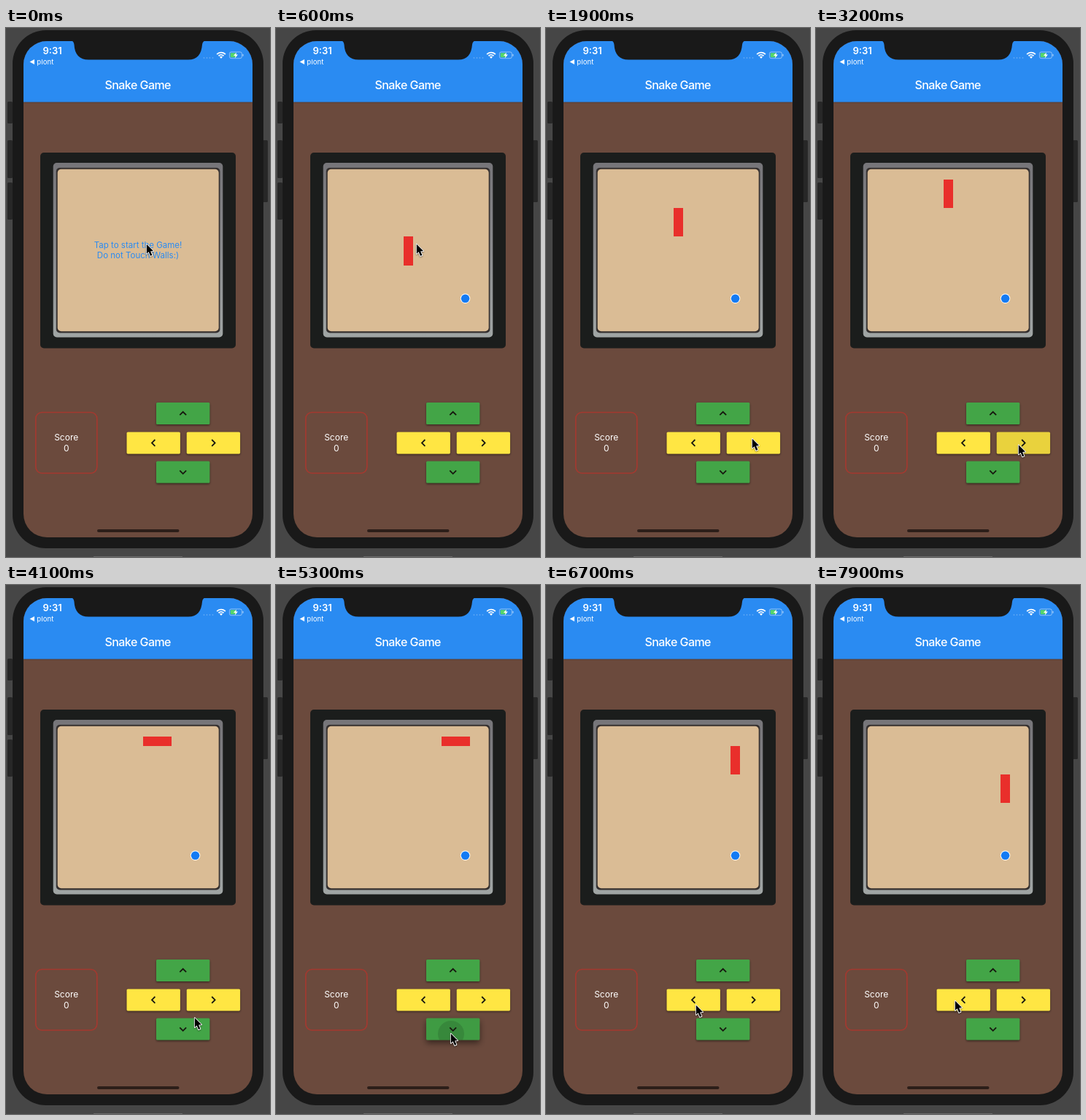
An HTML page with a canvas that plays this animation: 362x726 px, repeating every 8 s.

```html
<!DOCTYPE html>
<html lang="en">
<head>
<meta charset="utf-8">
<title>Snake Game</title>
<style>
html, body { margin: 0; width: 100%; height: 100%; overflow: hidden; background: #464646; }
canvas { display: block; width: 362px; height: 726px; }
</style>
</head>
<body>
<canvas id="stage"></canvas>
<script>
const W = 362, H = 726, LOOP = 8000, TICK = 400;
const START = 600, FIRST_TICK = 900;
const CELL = 13.06, BOARD_X = 70.2, BOARD_Y = 195;
const BLUE = '#2a8bf2', GREEN = '#43a547', YELLOW = '#ffe643', BROWN = '#6b4a3d', BEZEL = '#191919';
const FONT = 'Inter, Roboto, sans-serif';

const canvas = document.getElementById('stage');
const ctx = canvas.getContext('2d');
const dpr = window.devicePixelRatio || 1;
canvas.width = W * dpr;
canvas.height = H * dpr;

const buttons = {
  up: { x: 206, y: 514, color: GREEN, angle: 0 },
  left: { x: 165.5, y: 554.4, color: YELLOW, angle: -Math.PI / 2 },
  right: { x: 247.7, y: 554.4, color: YELLOW, angle: Math.PI / 2 },
  down: { x: 206, y: 594.6, color: GREEN, angle: Math.PI }
};
const BTN_W = 73.4, BTN_H = 30;

const presses = [
  { name: 'right', at: 2900, x: 278, y: 571 },
  { name: 'down', at: 5200, x: 240, y: 616 }
];

// Pointer stops: time, x, y
const stops = [
  [600, 192, 296], [1600, 283, 560], [1900, 282, 563], [2800, 277, 571.5],
  [3400, 277, 571.5], [4800, 239, 615], [5500, 239, 615],
  [6400, 206, 576], [6700, 205, 576], [7900, 190, 570]
];

function roundRect(x, y, w, h, r, fill) {
  ctx.beginPath();
  ctx.roundRect(x, y, w, h, r);
  if (fill) {
    ctx.fillStyle = fill;
    ctx.fill();
  }
}

function rect(x, y, w, h, fill) {
  ctx.fillStyle = fill;
  ctx.fillRect(x, y, w, h);
}

function circle(x, y, r, fill) {
  ctx.beginPath();
  ctx.arc(x, y, r, 0, Math.PI * 2);
  ctx.fillStyle = fill;
  ctx.fill();
}

function poly(points, fill) {
  ctx.beginPath();
  points.forEach(([x, y]) => ctx.lineTo(x, y));
  ctx.closePath();
  ctx.fillStyle = fill;
  ctx.fill();
}

function text(str, x, y, size, color, { weight = 400, align = 'center', spacing = 0 } = {}) {
  ctx.font = `${weight} ${size}px ${FONT}`;
  ctx.letterSpacing = spacing + 'px';
  ctx.textAlign = align;
  ctx.fillStyle = color;
  ctx.fillText(str, x, y);
}

function shadow(color, blur, dy) {
  ctx.shadowColor = color;
  ctx.shadowBlur = blur * dpr;
  ctx.shadowOffsetY = dy * dpr;
}

function gradient(y0, y1, ...colors) {
  const g = ctx.createLinearGradient(0, y0, 0, y1);
  colors.forEach((c, i) => g.addColorStop(i / (colors.length - 1), c));
  return g;
}

function drawPhone() {
  rect(0, 0, W, H, '#464646');
  for (const [x, y, h] of [[2, 101, 30], [2, 154, 52], [2, 212, 51], [352, 154, 85]]) {
    roundRect(x, y, 7, h, 1.5, '#272727');
  }
  roundRect(9, 3, 344, 711, 46, BEZEL);
  rect(120, 725, 122, 1, '#6a6a6a');

  ctx.save();
  roundRect(24, 18, 314, 681, 32);
  ctx.clip();
  rect(24, 18, 314, 681, BROWN);
  ctx.save();
  shadow('rgba(0,0,0,.3)', 2, 0.6);
  rect(24, 18, 314, 83.6, BLUE);
  ctx.restore();
  ctx.restore();

  ctx.beginPath();
  ctx.moveTo(89, 17);
  ctx.quadraticCurveTo(93, 18, 93.5, 23);
  ctx.bezierCurveTo(94, 36, 101, 43.5, 113, 43.5);
  ctx.lineTo(250, 43.5);
  ctx.bezierCurveTo(262, 43.5, 268, 36, 269, 23);
  ctx.quadraticCurveTo(269.5, 18, 274, 17);
  ctx.closePath();
  ctx.fillStyle = BEZEL;
  ctx.fill();
  roundRect(125, 688, 112.5, 4, 2, '#2c1e19');
}

function drawStatus() {
  text('9:31', 50.5, 35.5, 13, '#fff', { weight: 600, align: 'left' });
  poly([[32.5, 46.5], [39, 43], [39, 50]], '#fff');
  text('plont', 42.3, 50, 9.6, '#fff', { align: 'left', spacing: 0.1 });
  text('Snake Game', 180.7, 84, 16, '#fff', { weight: 500, spacing: -0.55 });
  for (let i = 0; i < 4; i++) circle(271.5 + i * 4, 41, 0.9, 'rgba(255,255,255,.25)');

  ctx.strokeStyle = '#fff';
  ctx.lineWidth = 1.8;
  for (const r of [4.8, 8]) {
    ctx.beginPath();
    ctx.arc(295, 41.6, r, -Math.PI * 0.76, -Math.PI * 0.24);
    ctx.stroke();
  }
  poly([[295, 42], [292.9, 39.6], [295, 38.7], [297.1, 39.6]], '#fff');

  ctx.lineWidth = 0.8;
  ctx.strokeStyle = 'rgba(255,255,255,.55)';
  roundRect(306.4, 32.9, 17, 8.8, 2.4);
  ctx.stroke();
  roundRect(324.3, 35.8, 1.3, 3, 0.6, 'rgba(255,255,255,.55)');
  roundRect(307.8, 34.3, 8, 6, 1.2, '#54d66a');
  poly([[316, 33.4], [312, 38], [314.7, 38], [313.8, 41.4], [318, 36.6], [315.3, 36.6]], '#fff');
}

function drawBoard() {
  roundRect(47, 171, 268, 268.5, 5, '#1b1d1c');
  roundRect(64.7, 185, 232.6, 239.5, 5, gradient(185, 424, '#767579', '#8a8b8e', '#a0a5a4'));
  roundRect(68.8, 191.8, 224.6, 226.6, 5, '#35302f');
  roundRect(70.7, 193.8, 221, 222.4, 5, '#dabc95');
}

// Head cell after n moves: up 6, right 6, then down.
function cellAt(n) {
  const right = Math.max(0, Math.min(n - 6, 6));
  const down = Math.max(0, n - 12);
  return [8 + right, 7 - Math.min(n, 6) + down];
}

// Cells snap to whole pixels so that neighbours meet without a seam.
function drawCell([c, r]) {
  const x = Math.round(BOARD_X + c * CELL), y = Math.round(BOARD_Y + r * CELL);
  const right = Math.round(BOARD_X + (c + 1) * CELL), bottom = Math.round(BOARD_Y + (r + 1) * CELL);
  rect(x, y, right - x, bottom - y, '#e92f2b');
}

function drawGame(t) {
  if (t < START) {
    text('Tap to start the Game!', 181, 302, 11.5, BLUE);
    text('Do not Touch Walls:)', 181, 316.3, 11.5, BLUE);
    return;
  }
  const moves = Math.max(0, Math.floor((t - FIRST_TICK) / TICK) + 1);
  [0, 1, 2].forEach(i => drawCell(cellAt(moves - i)));
  const fx = BOARD_X + 14.5 * CELL, fy = BOARD_Y + 13.5 * CELL;
  circle(fx, fy, 6.7, '#fff');
  circle(fx, fy, 5.8, '#147af3');
}

function drawScore() {
  roundRect(40.8, 527.5, 84, 83.5, 8.5);
  ctx.strokeStyle = '#a5382f';
  ctx.lineWidth = 1.6;
  ctx.stroke();
  text('Score', 82.7, 566, 12, '#fff');
  text('0', 82.7, 580.6, 12, '#fff');
}

function drawRipple(b, press, age) {
  const fade = Math.max(0, Math.min(1, (400 - age) / 200));
  ctx.save();
  roundRect(b.x, b.y, BTN_W, BTN_H, 1.6);
  ctx.clip();
  rect(b.x, b.y, BTN_W, BTN_H, `rgba(0,0,0,${0.06 * fade})`);
  circle(press.x, press.y, 4 + age * 0.14, `rgba(0,0,0,${0.12 * fade})`);
  ctx.restore();
}

function drawButton(name, t) {
  const b = buttons[name];
  const press = presses.find(p => p.name === name && t >= p.at && t < p.at + 400);
  const age = press ? t - press.at : 0;
  const raised = press && age > 0 && age < 300;

  ctx.save();
  shadow('rgba(0,0,0,.5)', raised ? 8 : 3, raised ? 4 : 1.3);
  roundRect(b.x, b.y, BTN_W, BTN_H, 1.6, b.color);
  ctx.restore();
  if (press) drawRipple(b, press, age);

  ctx.save();
  ctx.translate(b.x + BTN_W / 2, b.y + BTN_H / 2);
  ctx.rotate(b.angle);
  ctx.beginPath();
  ctx.moveTo(-4.4, 2.2);
  ctx.lineTo(0, -2.2);
  ctx.lineTo(4.4, 2.2);
  ctx.strokeStyle = '#17170f';
  ctx.lineWidth = 1.8;
  ctx.stroke();
  ctx.restore();
}

function pointerAt(t) {
  const i = stops.findIndex(s => s[0] > t);
  if (i === 0) return stops[0].slice(1);
  if (i < 0) return stops[stops.length - 1].slice(1);
  const [t0, x0, y0] = stops[i - 1], [t1, x1, y1] = stops[i];
  const p = (t - t0) / (t1 - t0);
  const e = p * p * (3 - 2 * p);
  return [x0 + (x1 - x0) * e, y0 + (y1 - y0) * e];
}

function drawPointer(t) {
  const [x, y] = pointerAt(t);
  ctx.save();
  ctx.translate(x + 0.8, y + 0.8);
  ctx.lineJoin = 'round';
  shadow('rgba(0,0,0,.35)', 2, 1);
  ctx.strokeStyle = '#fff';
  ctx.lineWidth = 1.8;
  poly([[0, 0], [0, 13], [2.9, 10.4], [5.2, 16], [7.6, 15], [5.3, 9.6], [9.2, 9.3]], '#000');
  ctx.stroke();
  shadow('transparent', 0, 0);
  ctx.fill();
  ctx.restore();
}

function draw(t) {
  ctx.setTransform(dpr, 0, 0, dpr, 0, 0);
  drawPhone();
  drawStatus();
  drawBoard();
  drawGame(t);
  drawScore();
  Object.keys(buttons).forEach(name => drawButton(name, t));
  drawPointer(t);
}

const begin = performance.now();
function frame() {
  const t = (performance.now() - begin) % LOOP;
  draw(Math.floor(t / 100) * 100);
  requestAnimationFrame(frame);
}
frame();
</script>
</body>
</html>
```
